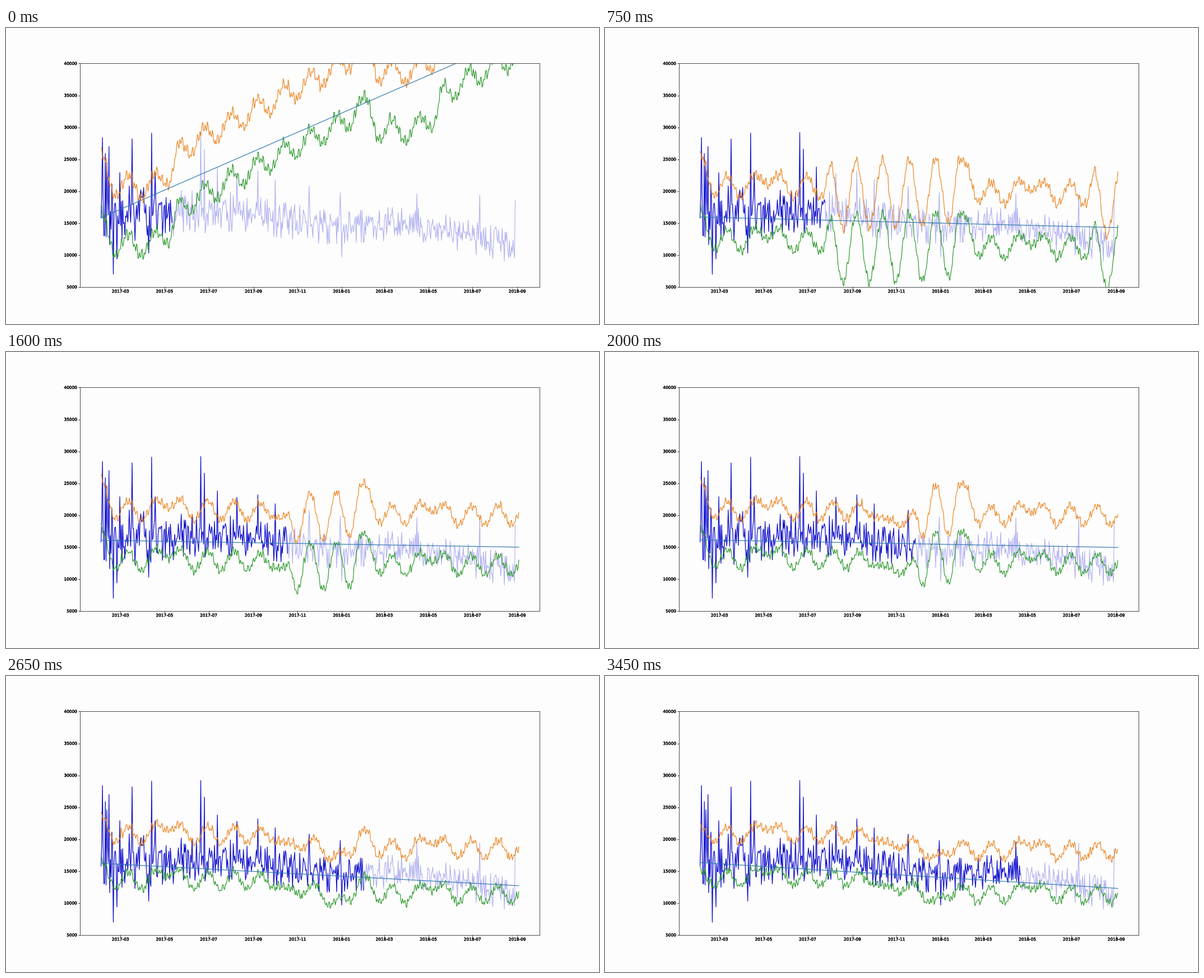
A matplotlib script for the animation above (3.5 s loop, 1058 by 529 pixels).

```python
import numpy as np
import matplotlib.pyplot as plt
from matplotlib import patheffects
from matplotlib.animation import FuncAnimation

FRAMES, INTERVAL = 70, 50
SPAN, YEAR, SWELL = 578, 365.25, 36.6
FIRST_SEEN, DAYS_PER_FRAME = 98, 5
days = np.arange(SPAN + 1)
start = np.datetime64("2017-02-02")

# Key moments of the forecast, values in hundreds.
KEYS = [0, 15, 24, 32, 48, 59, 69]
TREND_END = [443, 143, 242, 150, 149, 101, 123]
GUESS_LEVEL = [70, 46, 38, 42, 56, 45, 45]
GUESS_SWING = [16, 53, 15, 37, 45, 10, 10]

# Days on which the measured series spikes, in hundreds.
SPIKES = {0: 158, 2: 284, 4: 130, 6: 259, 8: 246, 11: 270, 17: 70, 22: 94,
          26: 229, 43: 282, 66: 103, 70: 291, 75: 229, 138: 292, 143: 266,
          161: 238, 188: 228, 217: 232, 241: 218, 288: 208, 331: 198,
          333: 97, 437: 196, 524: 194, 566: 97, 573: 185}


def smoothstep(a, b, x):
    u = np.clip((x - a) / (b - a), 0, 1)
    return u * u * (3 - 2 * u)


def bump(x, center, spread):
    return np.exp(-((x - center) / spread) ** 2 / 2)


def mix(a, b, amount):
    return a + (b - a) * amount


def settled_band(d, youth):
    """Upper band where the model has already seen the data."""
    level = 199 - 8 * np.tanh((d - 245) / 15)
    swing = 12 * (1 + 0.5 * youth) * (1 - 0.85 * bump(d, 255, 20))
    wave = swing * np.cos(2 * np.pi * (d - 1) / SWELL)
    return level + wave + 20 * bump(d, 92, 9) - 25 * bump(d, 328, 10)


def forecast(frame):
    """Upper band, lower band and trend for one frame."""
    seen = FIRST_SEEN + DAYS_PER_FRAME * frame
    youth = 1 - frame / (FRAMES - 1)
    trend_end, level, swing = (np.interp(frame, KEYS, v)
                               for v in (TREND_END, GUESS_LEVEL, GUESS_SWING))
    first = 158.5 + 5 * (1 - youth)
    slope = (trend_end - first) / SPAN

    def season(d):
        settled = settled_band(d, youth) - first - slope * d
        guess = (level * (0.6 + d / 700)
                 + swing * np.cos(2 * np.pi * (d - 326) / SWELL))
        return mix(settled, guess, smoothstep(seen - 6, seen + 12, d))

    d = days % YEAR
    yearly = mix(season(d), season(0), smoothstep(YEAR - 18, YEAR, d))
    gap = np.minimum(d, YEAR - d)
    yearly += 34 * (1 - smoothstep(335, 390, seen)) * bump(gap, 0, 9)

    week = 2 * np.pi * days / 7
    ripple = (6.5 + 4 * youth ** 4) * (0.5 * np.cos(week) + 0.6 * np.cos(2 * week - 1))
    trend = first + slope * days
    noise = np.random.default_rng(frame).normal(0, 1.8, (2, SPAN + 1))
    upper = trend + yearly + ripple
    lower = upper - 68 - 23 * youth ** 1.3
    return np.array([upper + noise[0], lower + noise[1], trend]) * 100


def measured_series():
    t = np.arange(574)
    rng = np.random.default_rng(12)
    level = np.interp(t, [0, 180, 310, 430, 505, 572], [164, 168, 144, 150, 130, 112])
    spread = 14 + 14 * np.exp(-t / 120)
    values = level + spread * np.clip(rng.normal(size=len(t)), -1.8, 1.8)
    values[list(SPIKES)] = list(SPIKES.values())
    return t, values * 100


fig = plt.figure(figsize=(20, 10), dpi=52.9, facecolor="#fdfdfd")
ax = fig.add_axes([0.125, 0.125, 0.775, 0.755], facecolor="#fdfdfd")
ax.set_xlim(-0.05 * SPAN, 1.05 * SPAN)
ax.set_ylim(5000, 40000)
months = np.arange("2017-03", "2018-10", 2, dtype="datetime64[M]")
ax.set_xticks((months.astype("datetime64[D]") - start).astype(int),
              [str(m) for m in months])
ax.set_yticks(range(5000, 40001, 5000))
ax.tick_params(labelsize=10, width=1.1)
for label in ax.get_xticklabels() + ax.get_yticklabels():
    label.set_family("DejaVu Sans")
    label.set_path_effects([patheffects.withStroke(linewidth=0.5, foreground="black")])
for spine in ax.spines.values():
    spine.set_linewidth(1.1)
    spine.set_color("#222222")

t, series = measured_series()
ax.plot(t, series, color="#b2b2f2", lw=1.6)
known, = ax.plot([], [], color="#1010cc", lw=1.6)
bands = [ax.plot([], [], color=c, lw=1.6)[0]
         for c in ("#ea8420", "#2a982a", "#2c76ae")]


def update(frame):
    n = FIRST_SEEN + DAYS_PER_FRAME * frame + 1
    known.set_data(t[:n], series[:n])
    for line, values in zip(bands, forecast(frame)):
        line.set_data(days, values)
    return [known, *bands]


anim = FuncAnimation(fig, update, frames=FRAMES, interval=INTERVAL,
                     repeat=True, repeat_delay=0)
plt.show()
```
